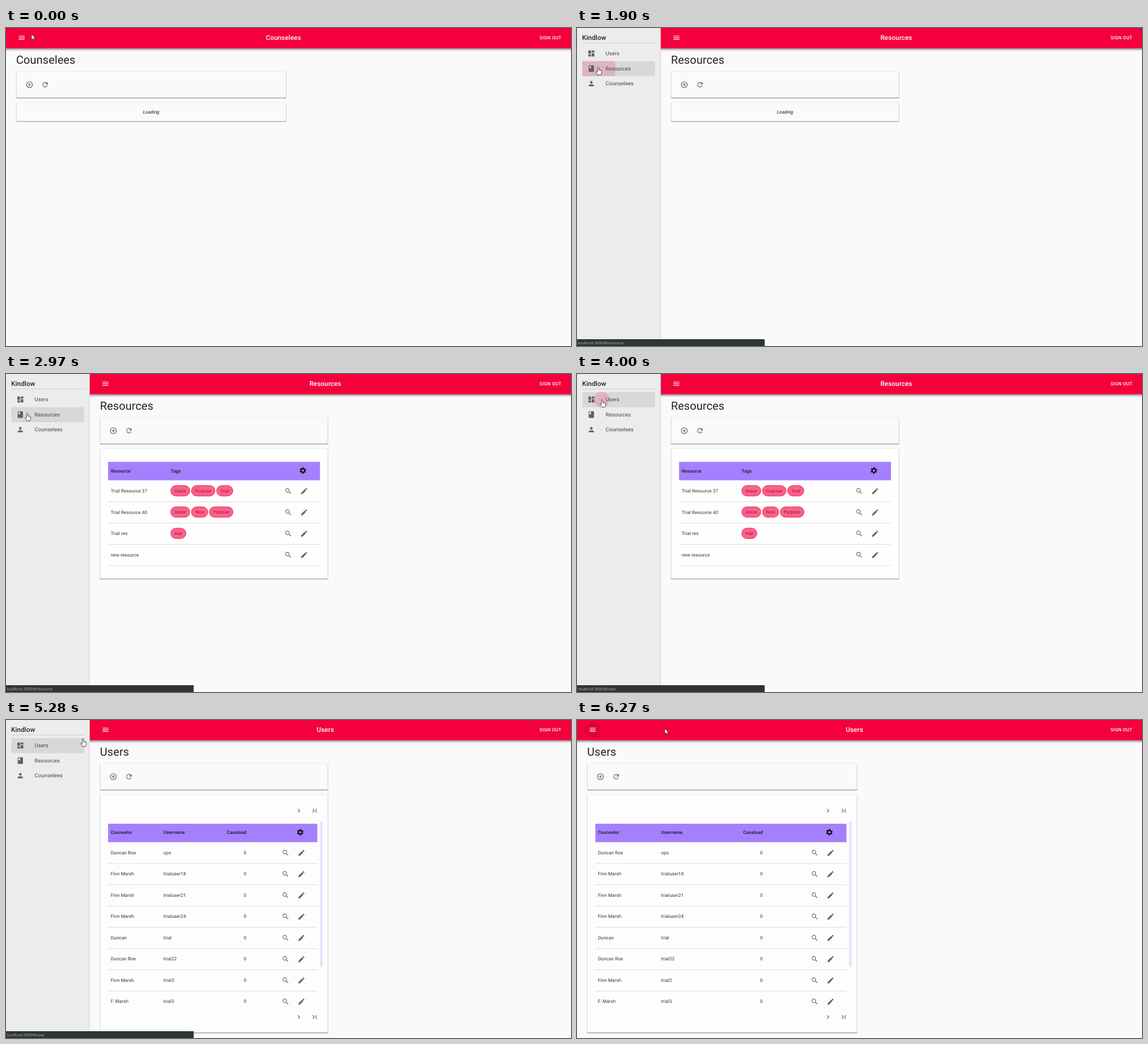
Recreate the animation shown at these times as an HTML page. Size 998x561 px, loop 6980 ms.

```html
<!DOCTYPE html>
<html lang="en">
<head>
<meta charset="utf-8">
<title>Counselees</title>
<style>
html, body { margin: 0; width: 100%; height: 100%; overflow: hidden; background: #fafafa; }
svg { display: block; width: 100vw; height: 100vh; }
text { font: 400 8.19px Roboto, sans-serif; letter-spacing: .09px; fill: #333; white-space: pre; text-rendering: geometricPrecision; }
.title { font-size: 11.7px; font-weight: 500; fill: #fff; text-anchor: middle; }
.brand { font-size: 11.7px; font-weight: 500; fill: #222; }
.heading { font-size: 19.9px; letter-spacing: .146px; fill: #212121; }
.button { font-weight: 500; letter-spacing: .23px; fill: #fff; }
.nav { font-size: 9.36px; fill: #444; }
.loading { font-style: italic; text-anchor: middle; fill: #111; }
.th { font-weight: 500; fill: #1c1626; }
.chip { font-size: 7.6px; fill: #a00d38; text-anchor: middle; }
.end { text-anchor: end; }
.url { font: 400 6.6px "Open Sans", sans-serif; letter-spacing: 0; fill: #b9bebe; }
</style>
</head>
<body>
<svg id="stage" viewBox="0 0 998 561" preserveAspectRatio="none"></svg>
<script>
const LOOP = 6980, OPEN = 148, RED = '#f4003d';
const ROW_TOP = 32, ROW = 26.55;
const PAGES = ['Counselees', 'Resources', 'Users'];
const NAV = [['dashboard', 'Users'], ['book', 'Resources'], ['person', 'Counselees']];

const ICONS = {
  menu: 'M3 18h18v-2H3zM3 13h18v-2H3zM3 6v2h18V6z',
  add: 'M13 7h-2v4H7v2h4v4h2v-4h4v-2h-4zM12 2a10 10 0 1 0 0 20 10 10 0 0 0 0-20zm0 18a8 8 0 1 1 0-16 8 8 0 0 1 0 16z',
  refresh: 'M17.65 6.35A8 8 0 1 0 19.73 14h-2.08A6 6 0 1 1 12 6c1.66 0 3.14.69 4.22 1.78L13 11h7V4z',
  dashboard: 'M3 13h8V3H3zM3 21h8v-6H3zM13 21h8V11h-8zM13 3v6h8V3z',
  book: 'M18 2H6a2 2 0 0 0-2 2v16a2 2 0 0 0 2 2h12a2 2 0 0 0 2-2V4a2 2 0 0 0-2-2zM6 4h5v8l-2.5-1.5L6 12z',
  person: 'M12 12a4 4 0 1 0 0-8 4 4 0 0 0 0 8zm0 2c-2.67 0-8 1.34-8 4v2h16v-2c0-2.66-5.33-4-8-4z',
  search: 'M15.5 14h-.79l-.28-.27a6.5 6.5 0 1 0-.7.7l.27.28v.79l5 4.99L20.49 19zm-6 0a4.5 4.5 0 1 1 0-9 4.5 4.5 0 0 1 0 9z',
  edit: 'M3 17.25V21h3.75L17.81 9.94l-3.75-3.75zM20.71 7.04a1 1 0 0 0 0-1.41l-2.34-2.34a1 1 0 0 0-1.41 0l-1.83 1.83 3.75 3.75z',
  next: 'M10 6L8.59 7.41 13.17 12l-4.58 4.59L10 18l6-6z',
  last: 'M5.59 7.41L10.18 12l-4.59 4.59L7 18l6-6-6-6zM16 6h2v12h-2z'
};
const ARROW = 'M0 0V9.6L2.2 7.6 3.8 11 5.4 10.3 3.9 7H6.8Z';
const HAND = 'M-1.2 .6Q0-1 1.2 .6V4.6L5 5.6Q6.4 6.1 6.2 7.6L5.6 11 4.8 13.6H-.6L-4 8.6Q-3.7 6.8-1.2 8.6Z';

// Each step lists only what changes from the step before.
const STEPS = [
  { t: 0, menu: 0, page: 0, ready: false, hand: false, x: 45, y: 11, row: 0, hover: 0, ripple: 0, ink: 0, press: 0, url: '', bar: 1 },
  { t: 150, x: 40, y: 12 },
  { t: 270, hand: true, x: 36, y: 14 },
  { t: 420, x: 33 },
  { t: 540, x: 31 },
  { t: 700, menu: 56, press: .1 },
  { t: 850, menu: 138, hand: false, x: 32, y: 18, press: .06 },
  { t: 970, menu: OPEN, x: 33, y: 23, press: .03 },
  { t: 1090, x: 34, y: 27, press: 0 },
  { t: 1240, hand: true, x: 37.5, y: 40 },
  { t: 1390, y: 52, hover: .6 },
  { t: 1510, y: 69, row: 1 },
  { t: 1780, hover: 1, ripple: 14, ink: .16, url: 'resource' },
  { t: 1900, page: 1, ripple: 32 },
  { t: 2030, ripple: 55, ink: .13 },
  { t: 2150, ripple: 80, ink: .08 },
  { t: 2290, ripple: 100, ink: .03 },
  { t: 2410, ink: 0 },
  { t: 2970, ready: true },
  { t: 3500, x: 40, y: 60 },
  { t: 3620, x: 42, y: 51, row: 0, url: 'user' },
  { t: 3760, x: 44.5, y: 45 },
  { t: 4000, ripple: 14, ink: .16 },
  { t: 4160, page: 2, ready: false, ripple: 40 },
  { t: 4300, ripple: 70, ink: .1 },
  { t: 4420, ripple: 100, ink: .03 },
  { t: 4580, ink: 0 },
  { t: 5140, ready: true, x: 123, y: 39 },
  { t: 5280, x: 136, y: 33 },
  { t: 5400, hand: false, x: 150, y: 25 },
  { t: 5550, hand: true, x: 161, y: 17, hover: .5 },
  { t: 5670, x: 165.5, y: 16, hover: .2, bar: .5 },
  { t: 5820, hover: 0, press: .1, url: '' },
  { t: 6120, menu: 36, hand: false, x: 155, y: 15 },
  { t: 6270, menu: 0, press: .07 }
];
let previous = {};
const STATES = STEPS.map(step => previous = { ...previous, ...step });

const text = (x, y, label, cls = '') => `<text x="${x}" y="${y}" class="${cls}">${label}</text>`;
const rect = (x, y, w, h, fill, more = '') => `<rect x="${x}" y="${y}" width="${w}" height="${h}" fill="${fill}" ${more}/>`;
const icon = (name, x, y, fill = '#616161') =>
  `<path transform="translate(${x - 7.02} ${y - 7.02}) scale(.585)" d="${ICONS[name]}" fill="${fill}"/>`;
const gear = (x, y) => `<g transform="translate(${x} ${y}) scale(.585)" fill="none" stroke="#111" stroke-width="3.6">
  <circle r="5.4"/><circle r="8" stroke-dasharray="4.4 3.98" stroke-dashoffset="-1.99"/></g>`;
const rule = (x, y, w) => rect(x, y - .4, w, .8, '#d2d2d2');
const actions = (right, y) => icon('search', right - 56, y) + icon('edit', right - 28, y);

// A card sits on a faint halo and a darker edge below it.
const card = (x, y, w, h, fill = '#fafafa') =>
  rect(x - .7, y - .5, w + 1.4, h + 2.3, '#000', 'rx="1.6" opacity=".12"') +
  rect(x - .2, y + .5, w + .4, h + .6, '#000', 'rx="1.2" opacity=".3"') +
  rect(x, y, w, h, fill, 'rx="1"');

function chips(x, y, tags) {
  const widths = { Grace: 34.5, Purpose: 42.5, Nice: 29.7, Trial: 29.4, trial: 27.5 };
  return tags.map(tag => {
    const w = widths[tag], left = x;
    x += w + 2;
    return rect(left + .4, y - 9.2, w - .8, 18.4, '#f8628a', 'rx="9.2" stroke="#f3144c" stroke-width=".9"') +
      text(left + w / 2, y + 2.7, tag, 'chip');
  }).join('');
}

function resourceTable(left, right) {
  const x = left + 14, w = right - left - 28, end = x + w;
  const rows = [
    ['Trial Resource 37', ['Grace', 'Purpose', 'Trial']],
    ['Trial Resource 40', ['Grace', 'Nice', 'Purpose']],
    ['Trial res', ['trial']],
    ['new resource', []]
  ];
  return card(left, 132, right - left, 229, '#fefefe') +
    rect(x, 155, w, 32.5, '#a67fff') +
    text(x + 4.6, 173.6, 'Resource', 'th') + text(x + 110.5, 173.6, 'Tags', 'th') + gear(end - 30.2, 170.3) +
    rows.map(([name, tags], i) => {
      const y = 206 + i * 37.55;
      return text(x + 4.6, y + 3, name) + chips(x + 110.3, y, tags) + actions(end, y + .6) + rule(x, y + 19.4, w);
    }).join('');
}

function userTable(left, right, menu) {
  const x = left + 14, end = right - 18.7, w = end - x;
  const userX = x + 116.3 - menu / 8, loadX = x + 296 - menu * .348;
  const rows = [
    ['Duncan Roe', 'ops'], ['Finn Marsh', 'trialuser18'], ['Finn Marsh', 'trialuser21'], ['Finn Marsh', 'trialuser24'],
    ['Duncan', 'trial'], ['Duncan Roe', 'trial22'], ['Finn Marsh', 'trial2'], ['F. Marsh', 'trial3']
  ];
  const pager = y => icon('next', right - 51.3, y) + icon('last', right - 23.6, y);
  return card(left, 132, right - left, 419.3, '#fdfdfd') + pager(160) + pager(524) +
    rect(right - 14, 178.5, 4.8, 257, '#ebe1ff', 'rx="1.5"') +
    rect(x, 183, w, 32.5, '#a67fff') +
    text(x + 4.6, 201.4, 'Counselor', 'th') + text(userX, 201.4, 'Username', 'th') +
    text(loadX, 201.4, 'Caseload', 'th end') + gear(end - 30.2, 198) +
    rows.map(([name, login], i) => {
      const y = 234 + i * 37.5;
      return text(x + 4.6, y + 2.8, name) + text(userX, y + 2.8, login) + text(loadX, y + 2.8, 0, 'end') +
        actions(end, y + .4) + (i < rows.length - 1 ? rule(x, y + 19.2, w) : '');
    }).join('');
}

function content(s) {
  const left = s.menu + 18.3, right = 494.6 + s.menu / 2;
  const body = !s.ready
    ? card(left, 132, right - left, 32.2) + text((left + right) / 2, 150.6, 'Loading', 'loading')
    : s.page === 1 ? resourceTable(left, right) : userTable(left, right, s.menu);
  return text(s.menu + 18, 63, PAGES[s.page], 'heading') +
    card(left, 77, right - left, 45.8) +
    icon('add', s.menu + 41.5, 100) + icon('refresh', s.menu + 69.2, 100) + body;
}

const topBar = s => rect(s.menu, 35.8, 998, 5.4, 'url(#shade)') + rect(s.menu, 0, 998, 35.8, RED) +
  `<circle cx="${s.menu + 27.7}" cy="17" r="13.5" opacity="${s.press}"/>` +
  icon('menu', s.menu + 27.7, 17.2, '#fff') +
  text(490 + s.menu / 2, 21.4, PAGES[s.page], 'title') + text(942.6, 19.8, 'SIGN OUT', 'button');

function sidebar(s) {
  if (!s.menu) return '';
  const top = ROW_TOP + s.row * ROW;
  const fade = Math.max(0, (s.menu - 56) / (OPEN - 56));
  return `<g transform="translate(${s.menu - OPEN} 0)">` +
    rect(0, 0, OPEN, 561, '#ececec') + rect(OPEN - .8, 0, .8, 561, '#d0d0d0') +
    `<g opacity="${fade}">` + text(9, 21.4, 'Kindlow', 'brand') + rect(9, 26, 129.5, .8, '#c9c9c9') +
    rect(9.3, top, 128.7, ROW, '#d8d8d8', `opacity="${s.hover}"`) +
    `<clipPath id="row">${rect(9.3, top, 128.7, ROW, '#000')}</clipPath>
     <circle cx="${s.x - 1}" cy="${top + ROW / 2}" r="${s.ripple}" fill="${RED}" opacity="${s.ink}" clip-path="url(#row)"/>` +
    NAV.map(([name, label], i) => icon(name, 25.3, 45 + i * ROW) + text(50.6, 48 + i * ROW, label, 'nav')).join('') +
    '</g></g>';
}

const statusBar = s => s.url && `<g opacity="${s.bar}">` + rect(0, 549, 331.5, 12, '#2d3535') +
  text(1.5, 557.5, 'localhost:3000/#/' + s.url, 'url') + '</g>';

const cursor = s => `<path transform="translate(${s.x} ${s.y})" d="${s.hand ? HAND : ARROW}"
  fill="#fff" stroke="#222" stroke-width=".8" stroke-linejoin="round"/>` +
  (s.hand ? `<path transform="translate(${s.x} ${s.y})" d="M1.2 4.6V7M3 5.2V7.2M4.7 5.6V7.4" stroke="#444" stroke-width=".5"/>` : '');

const SHADE = `<linearGradient id="shade" x2="0" y2="1"><stop stop-opacity=".45"/>
  <stop offset=".5" stop-opacity=".17"/><stop offset="1" stop-opacity="0"/></linearGradient>`;

const stage = document.getElementById('stage');
let shown;
function draw(now) {
  const time = now % LOOP;
  const state = STATES.findLast(s => s.t <= time) || STATES[0];
  if (state !== shown) {
    shown = state;
    stage.innerHTML = SHADE + rect(0, 0, 998, 561, '#fafafa') +
      content(state) + topBar(state) + sidebar(state) + statusBar(state) + cursor(state);
  }
}

const start = performance.now();
function tick() {
  draw(performance.now() - start);
  requestAnimationFrame(tick);
}
tick();
</script>
</body>
</html>
```
